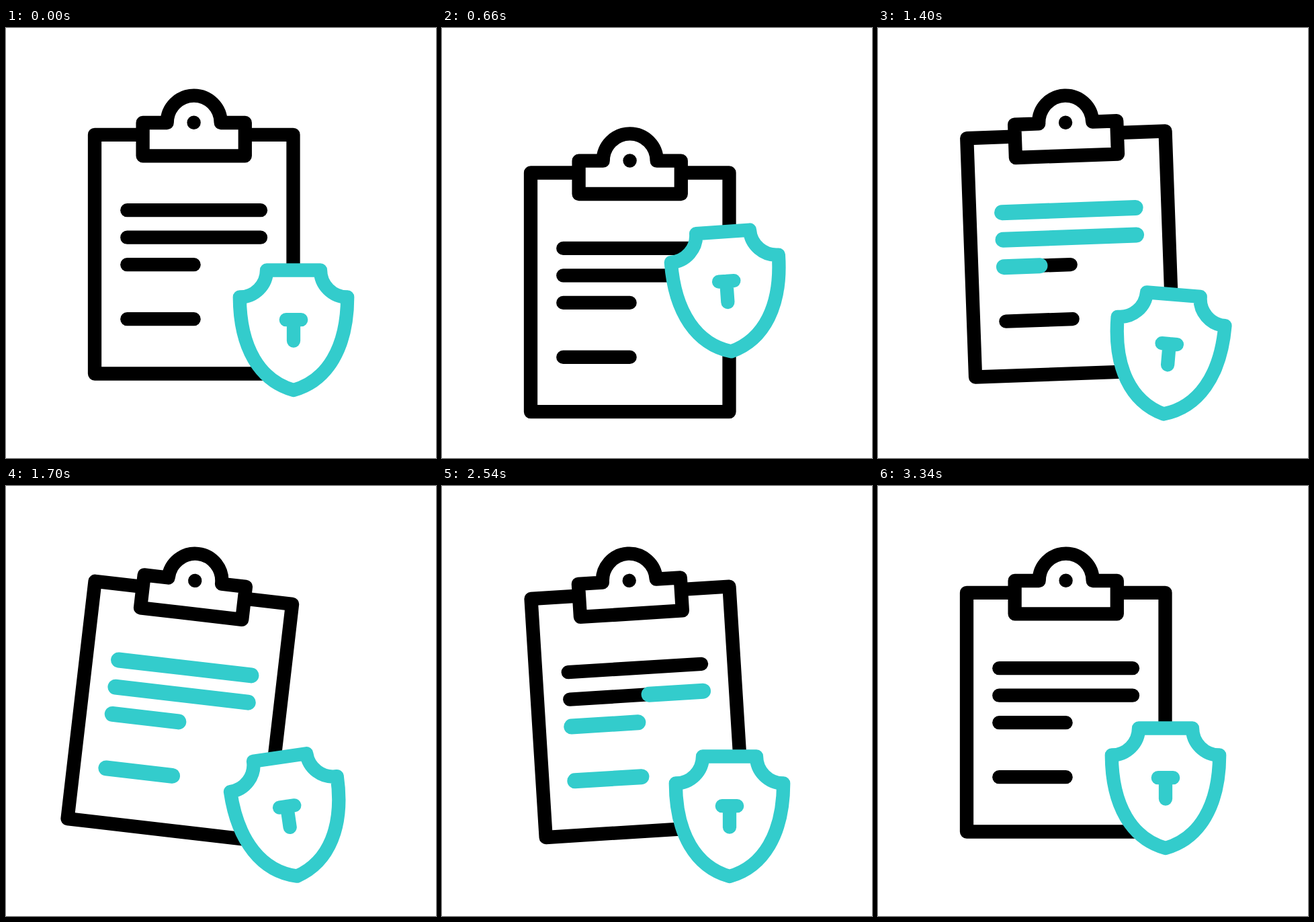
Recreate the animation shown at these times as an HTML page. Size 640 by 640 pixels, loop 3600 ms.

```html
<!DOCTYPE html>
<html lang="en">
<head>
<meta charset="utf-8">
<title>Protected clipboard</title>
<style>
  html, body { margin: 0; width: 100%; height: 100%; overflow: hidden; background: #fff; }
  svg { display: block; width: 100vw; height: 100vh; }
  .ink { fill: none; stroke: #000; stroke-width: 20.3; stroke-linecap: round; stroke-linejoin: round; }
  .solid { fill: #fff; }
  .teal { stroke: #33cccc; }
  .mark { stroke-width: 23; }
</style>
</head>
<body>
<svg viewBox="0 0 640 640">
  <g id="board">
    <rect class="ink solid" x="132" y="158.8" width="295.5" height="355.7"/>
    <path class="ink solid" d="M203.6 141H239.7A39.8 40.2 0 0 1 319.7 141H355.8V190.3H203.6Z"/>
    <circle cx="279.6" cy="140.8" r="10.2"/>
    <g id="lines"></g>
  </g>
  <g id="shield">
    <path class="ink solid teal" d="M388 360.5H468A40 40 0 0 0 508.2 400.5C508 476 478 525 428 539C378 525 348 476 347.8 400.5A40 40 0 0 0 388 360.5Z"/>
    <path class="ink teal" d="M416.8 434.2H439.2M428 434.2V465.5"/>
  </g>
</svg>
<script>
const LOOP = 3600;
const LEFT = 180.3;

// Each track is a list of [time in ms, value], eased in and out between keys.
const boardY = [[205, 0], [570, 60], [1210, 0]];
const boardTurn = [[841, 0], [1286, -3.6], [1772, 7.25], [2258, -4.3], [3340, 0]];
const shieldY = [[205, 0], [570, -60], [1550, 42], [2792, 42], [3340, 0]];
const shieldTurn = [[455, 0], [930, -10], [1283, 10], [1636, -10], [1990, 10], [2450, 0]];

// Text lines: y and right end.
const rows = [[271.2, 379], [311.7, 379], [352.2, 279.6], [433.2, 279.6]];
const drawStart = 921, wipeStart = 2244, step = 190;

const byId = id => document.getElementById(id);
const board = byId("board"), shield = byId("shield"), lines = byId("lines");

function addLine(cls, y, right) {
  const el = document.createElementNS("http://www.w3.org/2000/svg", "line");
  const attrs = { class: cls, x1: LEFT, x2: right, y1: y, y2: y };
  for (const name in attrs) el.setAttribute(name, attrs[name]);
  return lines.appendChild(el);
}

rows.forEach(([y, right]) => addLine("ink", y, right));
const marks = rows.map(([y, right]) => addLine("ink teal mark", y, right));

function ease(from, to, t) {
  const s = Math.min(1, Math.max(0, (t - from) / (to - from)));
  return s * s * (3 - 2 * s);
}

function valueAt(track, t) {
  let value = track[0][1];
  for (let i = 1; i < track.length; i++) {
    const [t0, v0] = track[i - 1], [t1, v1] = track[i];
    if (t >= t0) value = v0 + (v1 - v0) * ease(t0, t1, t);
  }
  return value;
}

function pose(el, y, turn, px, py) {
  el.setAttribute("transform", `translate(0 ${y}) rotate(${turn} ${px} ${py})`);
}

function render(t) {
  pose(board, valueAt(boardY, t), valueAt(boardTurn, t), 279.6, 155);
  pose(shield, valueAt(shieldY, t), valueAt(shieldTurn, t), 428, 503);
  marks.forEach((mark, i) => {
    const length = rows[i][1] - LEFT;
    const a = drawStart + i * step, b = wipeStart + i * step;
    const head = ease(a, a + step, t), tail = ease(b, b + step, t);
    mark.setAttribute("x1", LEFT + length * tail);
    mark.setAttribute("x2", LEFT + length * head);
    mark.setAttribute("visibility", head > tail ? "visible" : "hidden");
  });
}

const start = performance.now();
function tick() {
  render((performance.now() - start) % LOOP);
  requestAnimationFrame(tick);
}
tick();
</script>
</body>
</html>
```
